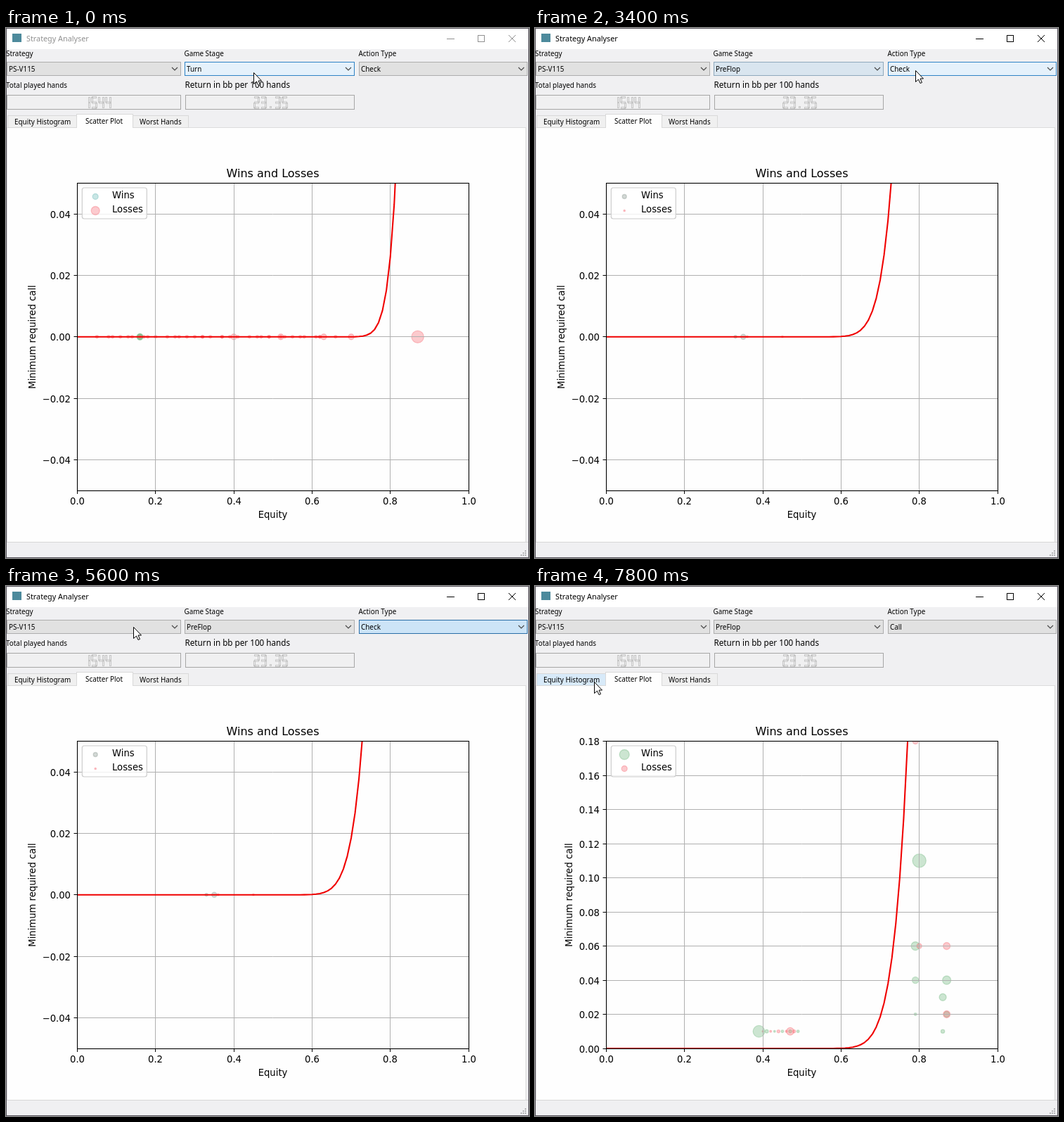
An HTML page with a canvas that plays this animation: 744x753 px, repeating every 8 s.

```html
<!DOCTYPE html>
<html lang="en">
<head>
<meta charset="utf-8">
<title>Strategy Analyser</title>
<style>
  html, body { margin: 0; width: 100%; height: 100%; overflow: hidden; background: #f0f0f2; }
  canvas { display: block; }
</style>
</head>
<body>
<canvas id="stage" width="744" height="753"></canvas>
<script>
const ctx = document.getElementById('stage').getContext('2d');
const LOOP = 8000, STEP = 200;
const UI = '9.9px "Noto Sans", sans-serif';
const UI_LARGE = '11.7px "Noto Sans", sans-serif';
const PLOT = '13.2px "DejaVu Sans", sans-serif';
const PLOT_TITLE = '16px "DejaVu Sans", sans-serif';
const GREEN = '100,175,115', TEAL = '90,180,175', GREY = '125,140,130', RED = '245,95,105';

const STAGES = ['All', 'PreFlop', 'Flop', 'Turn', 'River'];
const ACTIONS = ['Fold', 'Check', 'Call', 'Bet', 'BetPlus', 'Bet half pot', 'Bet pot', 'Bet Bluff'];
const COMBO_LOOK = {
  normal: ['#e1e1e1', '#adadad'],
  fading: ['#d9e5ef', '#8fa9bd'],
  hover: ['#e5f1fb', '#2f83c5'],
  pressed: ['#cce4f7', '#2a6ea8']
};

// Each move eases the pointer to a new resting place.
const POINTER_START = { x: 352, y: 63 };
const MOVES = [
  { from: 200, to: 1000, x: 360, y: 92 },
  { from: 1600, to: 2400, x: 533, y: 62 },
  { from: 2600, to: 3400, x: 541, y: 60 },
  { from: 3800, to: 4400, x: 545, y: 96 },
  { from: 4800, to: 5600, x: 181, y: 58 },
  { from: 6200, to: 7000, x: 204, y: 135 },
  { from: 7200, to: 7800, x: 84, y: 136 }
];

function seeded(seed) {
  return () => (seed = seed * 16807 % 2147483647) / 2147483647;
}

const times = (n, make) => Array.from({ length: n }, (_, i) => make(i));
const point = (x, y, r, color) => ({ x, y, r, color });
const powerCurve = (start, scale, exponent) => x => (Math.max(0, x - start) / scale) ** exponent;

function turnPoints() {
  const random = seeded(15);
  const small = times(36, i => point((5 + Math.floor(i * 1.7 + random() * 2)) / 100, 0, 2, RED));
  const medium = [.4, .52, .63, .7].map(x => point(x, 0, 4, RED));
  const wins = times(3, i => point(.16, 0, 4.5 - i / 2, GREEN));
  return [...wins, ...small, ...medium, point(.87, 0, 8.7, RED)];
}

function callPoints() {
  const random = seeded(7);
  const row = times(10, i => point(.4 + i / 100, .01, 1 + 1.5 * random(), i % 2 ? GREEN : RED));
  return [
    ...row,
    point(.39, .01, 8.3, GREEN), point(.8, .11, 9.6, GREEN), point(.79, .06, 6, GREEN),
    point(.79, .04, 4.6, GREEN), point(.87, .04, 6, GREEN), point(.86, .03, 5, GREEN),
    point(.86, .01, 2.6, GREEN), point(.79, .02, 1.8, GREEN), point(.87, .02, 4, GREEN),
    point(.47, .01, 5.4, RED), point(.8, .06, 3.5, RED), point(.87, .06, 5, RED),
    point(.87, .02, 5, RED), point(.79, .18, 4, RED)
  ];
}

const preflopCurve = powerCurve(.49, .348, 7.9);
const CHARTS = {
  turn: {
    min: -.05, max: .05, curve: powerCurve(.622, .2636, 9.3), points: turnPoints(),
    legend: [point(0, 0, 4, TEAL), point(0, 0, 6, RED)]
  },
  check: {
    min: -.05, max: .05, curve: preflopCurve,
    points: [point(.33, 0, 2, GREY), point(.35, 0, 3.6, GREY), point(.36, 0, 1.5, RED), point(.45, 0, 1.3, RED)],
    legend: [point(0, 0, 3, GREY), point(0, 0, 1.2, RED)]
  },
  call: {
    min: 0, max: .18, curve: preflopCurve, points: callPoints(),
    legend: [point(0, 0, 7, GREEN), point(0, 0, 4, RED)]
  }
};

function rect(x, y, w, h, fill, stroke) {
  if (fill) { ctx.fillStyle = fill; ctx.fillRect(x, y, w, h); }
  if (stroke) {
    ctx.strokeStyle = stroke; ctx.lineWidth = 1;
    ctx.strokeRect(x + .5, y + .5, w - 1, h - 1);
  }
}

function line(points, color, width = 1) {
  ctx.beginPath();
  points.forEach(([x, y]) => ctx.lineTo(x, y));
  ctx.strokeStyle = color; ctx.lineWidth = width;
  ctx.stroke();
}

function text(s, x, y, font = UI, color = '#000', align = 'left') {
  ctx.font = font; ctx.fillStyle = color; ctx.textAlign = align;
  ctx.fillText(s, x, y);
}

function dot(x, y, { r, color }) {
  ctx.beginPath(); ctx.arc(x, y, r, 0, 2 * Math.PI);
  ctx.fillStyle = ctx.strokeStyle = `rgba(${color},.33)`;
  ctx.lineWidth = 1.3;
  ctx.fill(); ctx.stroke();
}

function pointerAt(t) {
  let { x, y } = POINTER_START;
  for (const move of MOVES) {
    const k = Math.min(1, Math.max(0, (t - move.from) / (move.to - move.from)));
    const eased = k * k * (3 - 2 * k);
    x += (move.x - x) * eased;
    y += (move.y - y) * eased;
  }
  return { x: Math.round(x), y: Math.round(y) };
}

function drawWindow(active) {
  rect(0, 0, 744, 753, '#f0f0f2');
  rect(1, 1, 742, 29, '#fff');
  rect(9, 8, 13, 12, '#4d8a9c');
  const ink = active ? '#000' : '#909090';
  text('Strategy Analyser', 29, 19, '10.8px "Noto Sans", sans-serif', ink);
  line([[627, 15.5], [638, 15.5]], ink);
  rect(671, 10, 10, 10, null, ink);
  line([[715, 10], [725, 20]], ink);
  line([[725, 10], [715, 20]], ink);
}

function drawBorder() {
  rect(1, 730, 742, 1, '#d7d7d7');
  for (let i = 0; i < 3; i++)
    for (let j = 0; j <= i; j++) rect(732 + i * 3, 748 - j * 3, 2, 2, '#b4b4b6');
  rect(0, 0, 744, 753, null, '#57535c');
}

function drawCombo(label, x, right, value, look) {
  const [fill, border] = COMBO_LOOK[look];
  text(label, x === 1 ? 0 : x - .5, 40);
  rect(x, 48, right - x, 20, fill, border);
  text(value, x + 3, 62);
  line([[right - 13, 56], [right - 9, 60], [right - 5, 56]], '#444', 1.1);
}

// Horizontal segments a, g, d run downwards; vertical ones f, b, e, c run row by row.
const SEGMENTS = { 1: 'bc', 2: 'abged', 3: 'abgcd', 4: 'fgbc', 5: 'afgcd' };

function drawLcd(value, x, width, firstCell) {
  rect(x, 95, width, 21, '#f0f0f1', '#a6a6a6');
  ctx.strokeStyle = '#c6c6c6';
  [...value].forEach((ch, i) => {
    const left = firstCell + i * 10 + .5, top = 97.5;
    if (ch === '.') return ctx.strokeRect(left + 3, top + 14, 2, 2);
    for (const segment of SEGMENTS[ch]) {
      const level = 'agd'.indexOf(segment), side = 'fbec'.indexOf(segment);
      if (level >= 0) ctx.strokeRect(left + 1, top + level * 7.5, 6, 2);
      else ctx.strokeRect(left + side % 2 * 6, top + 1 + (side >> 1) * 8, 2, 7);
    }
  });
}

function drawTab(label, x, width, textX, pointer) {
  const over = pointer && pointer.x >= x && pointer.x < x + width && pointer.y > 124 && pointer.y < 141;
  rect(x, 124, width, 18, over ? '#d8eaf9' : '#f0f0f0', '#d9d9d9');
  text(label, textX, 137);
}

function drawTabs(pointer) {
  rect(1, 141, 739, 590, '#fefefe', '#dcdcdc');
  drawTab('Equity Histogram', 2, 99, 12, pointer);
  drawTab('Worst Hands', 180, 80, 190, pointer);
  rect(100, 122, 81, 20, '#fefefe', '#d9d9d9');
  rect(101, 140, 79, 3, '#fefefe');
  text('Scatter Plot', 113, 136);
}

function drawLegend(markers) {
  ctx.beginPath(); ctx.roundRect(108.3, 227, 92, 44, 3);
  ctx.fillStyle = 'rgba(255,255,255,.8)'; ctx.fill();
  ctx.strokeStyle = '#ccc'; ctx.lineWidth = 1.2; ctx.stroke();
  ['Wins', 'Losses'].forEach((label, i) => {
    dot(127.2, 239.5 + i * 20, markers[i]);
    text(label, 151, 242 + i * 20, PLOT);
  });
}

function clipped(x, y, w, h, paint) {
  ctx.save();
  ctx.beginPath(); ctx.rect(x, y, w, h); ctx.clip();
  paint();
  ctx.restore();
}

function drawChart({ min, max, curve, points, legend }) {
  const left = 101.5, top = 220.5, width = 556.5, height = 436.5;
  const right = left + width, bottom = top + height;
  const toX = v => left + v * width;
  const toY = v => top + (max - v) / (max - min) * height;
  const crisp = v => Math.floor(v) + .5;

  clipped(left, top, width, height, () => points.forEach(p => dot(toX(p.x), toY(p.y), p)));

  for (let i = 0; i <= 5; i++) {
    const x = crisp(toX(i / 5));
    line([[x, top], [x, bottom]], '#b0b0b0');
    line([[x, bottom], [x, bottom + 5]], '#000');
    text((i / 5).toFixed(1), x, 677, PLOT, '#000', 'center');
  }
  let labelWidth = 0;
  for (let i = Math.ceil(min / .02); i <= max / .02 + .01; i++) {
    const y = crisp(toY(i * .02));
    const label = (i * .02).toFixed(2).replace('-', '\u2212');
    line([[left, y], [right, y]], '#b0b0b0');
    line([[left - 5, y], [left, y]], '#000');
    text(label, 92, y + 5, PLOT, '#000', 'right');
    labelWidth = Math.max(labelWidth, ctx.measureText(label).width);
  }

  clipped(left, top, width, height + 1, () => {
    ctx.lineJoin = 'round';
    line(times(101, i => [toX(i / 100), toY(curve(i / 100))]), '#f00000', 2.08);
  });

  ctx.strokeStyle = '#000'; ctx.lineWidth = 1.1;
  ctx.strokeRect(left, top, crisp(right) - left, crisp(bottom) - top);
  text('Wins and Losses', 379.5, 212, PLOT_TITLE, '#000', 'center');
  text('Equity', 379.5, 695.5, PLOT, '#000', 'center');
  ctx.save();
  ctx.translate(92 - labelWidth - 9.5, 439);
  ctx.rotate(-Math.PI / 2);
  text('Minimum required call', 0, 0, PLOT, '#000', 'center');
  ctx.restore();
  drawLegend(legend);
}

function drawPopup(items, x, width, pointerY, current) {
  const pitch = 12.5, top = 67, height = Math.round(items.length * pitch) + 1;
  const over = pointerY > top ? Math.floor((pointerY - top) / pitch) : current;
  for (const offset of [3, 2]) rect(x + offset, top + offset, width, height, 'rgba(0,0,0,.25)');
  rect(x, top, width, height, '#fff', '#646464');
  items.forEach((item, i) => {
    const y = Math.floor(top + 1 + i * pitch);
    if (i === over) rect(x + 1, y, width - 2, 13, '#0078d7');
    text(item, x + 3, y + 10, UI, i === over ? '#fff' : '#000');
  });
}

const ARROW = new Path2D('M0 0V16L4 12.5L6.5 18L9 17L6.5 11.5H11Z');

function drawPointer({ x, y }) {
  ctx.save();
  ctx.translate(x + .5, y + .5);
  ctx.lineJoin = 'miter'; ctx.lineWidth = 1;
  ctx.fillStyle = '#fff'; ctx.fill(ARROW);
  ctx.strokeStyle = '#000'; ctx.stroke(ARROW);
  ctx.restore();
}

function draw(t) {
  const between = (a, b) => t >= a && t < b;
  const pointer = pointerAt(t);
  const preflop = t >= 3200, call = t >= 6600;
  const stageLook = t < 600 || between(6600, 7200) ? 'hover'
    : t < 3200 ? 'pressed' : t < 3600 ? 'fading' : 'normal';
  const actionLook = between(3200, 4000) ? 'hover' : between(4000, 6600) ? 'pressed' : 'normal';

  drawWindow(t >= 600);
  drawCombo('Strategy', 1, 249, 'PS-V115', 'normal');
  drawCombo('Game Stage', 254, 496, preflop ? 'PreFlop' : 'Turn', stageLook);
  drawCombo('Action Type', 502, 742, call ? 'Call' : 'Check', actionLook);
  text('Total played hands', 0, 85);
  text('Return in bb per 100 hands', 254.5, 85, UI_LARGE);
  drawLcd('1544', 1, 248, 111);
  drawLcd('23.35', 255, 241, 352);
  drawTabs(t > 7000 && pointer);
  drawChart(call ? CHARTS.call : preflop ? CHARTS.check : CHARTS.turn);
  drawBorder();
  if (between(600, 1600)) drawPopup(STAGES, 255, 241, pointer.y, STAGES.indexOf('Turn'));
  if (between(4000, 4600)) drawPopup(ACTIONS, 502, 240, pointer.y, ACTIONS.indexOf('Check'));
  drawPointer(pointer);
}

function tick(now) {
  draw(Math.floor(now % LOOP / STEP) * STEP);
  requestAnimationFrame(tick);
}
draw(0);
requestAnimationFrame(tick);
</script>
</body>
</html>
```
